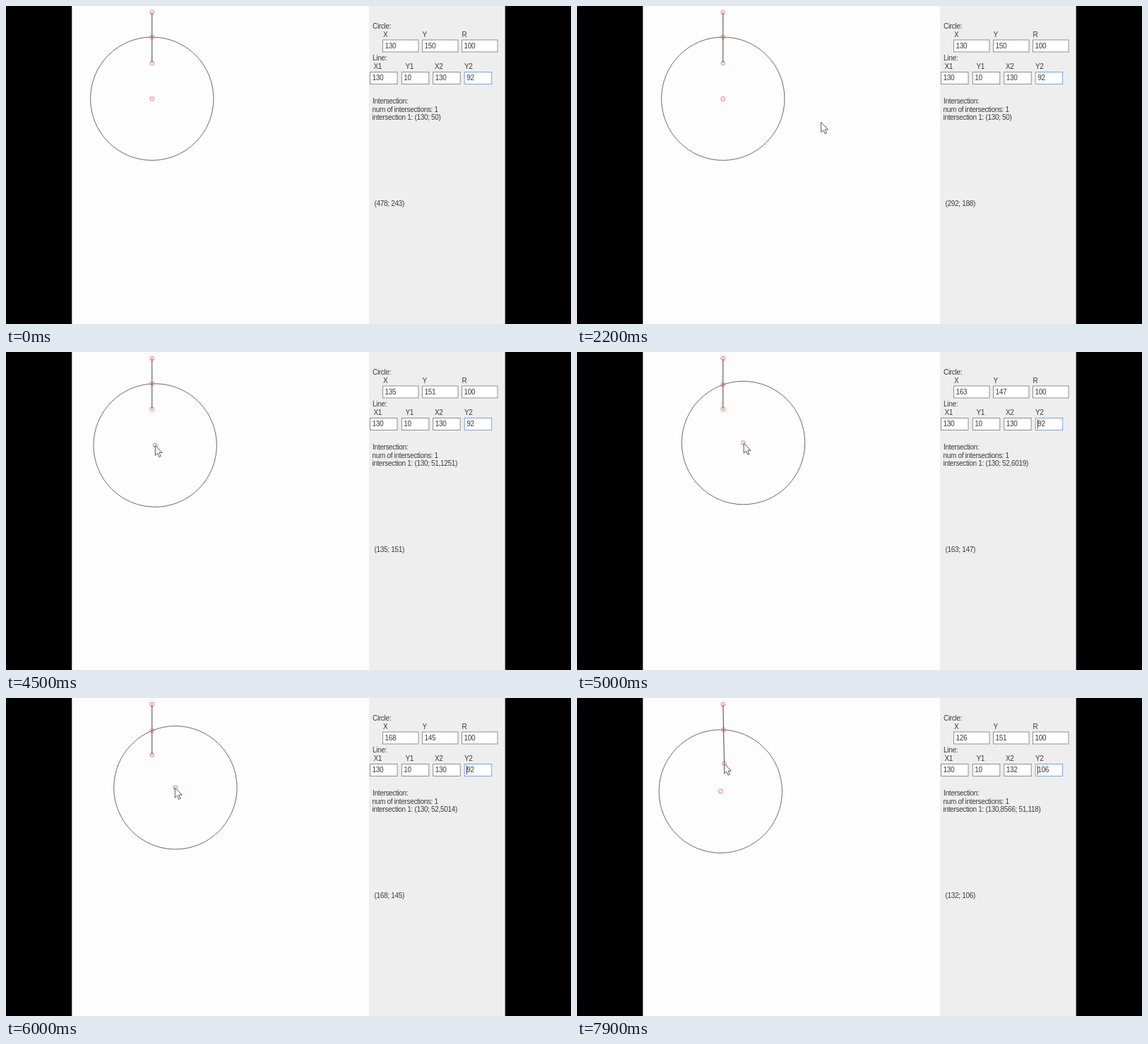
Write an HTML page that moves like this. It is 800x450 px and loops after 8 s.

```html
<!DOCTYPE html>
<html lang="en">
<head>
<meta charset="utf-8">
<title>Circle and line intersection</title>
<style>
  html, body { margin: 0; width: 100%; height: 100%; overflow: hidden; background: #000; }
  svg { display: block; width: 100%; height: 100%; }
  text { font: 10px "Liberation Sans", Arial, sans-serif; letter-spacing: -.32px; fill: #3c3c3c; white-space: pre; }
</style>
</head>
<body>
<svg id="stage" viewBox="0 0 800 450">
  <rect width="800" height="450"/>
  <rect x="93.3" width="420.7" height="450" fill="#fdfdfd"/>
  <rect x="514" width="192.7" height="450" fill="#eeeeef"/>
</svg>
<script>
const LOOP = 8000, STEP = 100, SCALE = 0.872, RADIUS = 100;
const stage = document.getElementById('stage');
const sx = x => 93.4 + x * SCALE;
const sy = y => 0.4 + y * SCALE;

function add(tag, attrs, content) {
  const el = document.createElementNS('http://www.w3.org/2000/svg', tag);
  set(el, attrs);
  if (content) el.textContent = content;
  return stage.appendChild(el);
}
function set(el, attrs) {
  for (const k in attrs) el.setAttribute(k, attrs[k]);
}
const label = (x, y, s) => add('text', { x, y }, s);
function field(x, y, w, value, stroke = '#858585') {
  add('rect', { x, y, width: w, height: 17, fill: '#fff', stroke, 'stroke-width': 0.9 });
  return label(x + 3, y + 11.8, value);
}

// Side panel
label(519, 32.3, 'Circle:');
label(534, 43.6, 'X');
label(589.5, 43.6, 'Y');
label(645.5, 43.6, 'R');
const cxField = field(533.5, 48, 50.5, '130');
const cyField = field(589.5, 48, 50.5, '150');
field(645.5, 48, 50.5, '100');
label(519, 77.4, 'Line:');
['X1', 'Y1', 'X2', 'Y2'].forEach((s, i) => label([520.5, 565.5, 607, 649][i], 88.7, s));
field(515.5, 93.5, 38.5, '130');
field(560.3, 93.5, 38.5, '10');
const x2Field = field(604.7, 93.5, 38.5, '130');
const y2Field = field(649.2, 93.5, 38.5, '92', '#6f9bdc');
const caret = add('path', { stroke: '#222', 'stroke-width': 0.9 });
label(519, 138.4, 'Intersection:');
label(518.5, 149.9, 'num of intersections: 1');
const hitText = label(518.5, 161.3, '');
const mouseText = label(521.5, 282.5, '');

// Drawing area
const circle = add('circle', { r: RADIUS * SCALE, fill: 'none', stroke: '#444', 'stroke-width': 0.8 });
const line = add('line', { x1: sx(130), y1: sy(10), stroke: '#333', 'stroke-width': 0.9 });
const dots = Array.from({ length: 4 }, () =>
  add('circle', { r: 2.8, fill: 'none', stroke: '#de4458', 'stroke-width': 0.75 }));
const beam = add('path', { d: 'M-3-8h2.5l.5.6.5-.6H3M0-7.4V7.4M-3 8h2.5l.5-.6.5.6H3', fill: 'none', stroke: '#222' });
const arrow = add('path', {
  d: 'M0 0V14.3L3.3 11.3L5.5 16.4L7.8 15.4L5.6 10.4H9.8Z',
  fill: '#fff', stroke: '#444', 'stroke-width': 0.9, 'stroke-linejoin': 'round'
});

// Mouse path: time, x, y
const keys = [
  [1100, 655, 111], [1200, 652, 112], [1600, 595, 138], [2000, 432, 180], [2200, 292, 188],
  [2500, 188, 172], [2900, 131, 154], [3400, 128, 151], [4200, 128, 151],
  [4500, 135, 151], [5100, 169, 147], [5500, 188, 147], [5700, 192, 146],
  [6000, 168, 145], [6150, 142, 143], [6350, 126, 151], [6400, 126, 151],
  [6600, 108, 134], [6900, 121, 95], [7500, 130, 92], [7600, 130, 92], [7900, 132, 106]
];

// Monotone cubic through the keys, so rests stay still
function slope(i, c) {
  const a = keys[i - 1], b = keys[i], d = keys[i + 1];
  if (!a || !d) return 0;
  const p = (b[c] - a[c]) / (b[0] - a[0]), q = (d[c] - b[c]) / (d[0] - b[0]);
  return p * q > 0 ? 2 * p * q / (p + q) : 0;
}
function mouse(t) {
  const last = keys.length - 1;
  if (t <= keys[0][0]) return keys[0].slice(1);
  if (t >= keys[last][0]) return keys[last].slice(1);
  const i = keys.findIndex(k => k[0] > t) - 1;
  const a = keys[i], b = keys[i + 1], h = b[0] - a[0], u = (t - a[0]) / h;
  return [1, 2].map(c =>
    a[c] + (b[c] - a[c]) * u * u * (3 - 2 * u) +
    h * u * (1 - u) * (slope(i, c) * (1 - u) - slope(i + 1, c) * u));
}
const point = t => mouse(t).map(Math.round);
const num = v => String(+v.toFixed(4)).replace('.', ',');

function intersect([cx, cy], [x2, y2]) {
  const dx = x2 - 130, dy = y2 - 10, fx = 130 - cx, fy = 10 - cy;
  const a = dx * dx + dy * dy, b = fx * dx + fy * dy, c = fx * fx + fy * fy - RADIUS * RADIUS;
  const u = (-b - Math.sqrt(b * b - a * c)) / a;
  return [130 + u * dx, 10 + u * dy];
}

function draw(time) {
  const t = Math.floor(time / STEP) * STEP;
  const center = t < 4300 ? [130, 150] : point(Math.min(t, 6400));
  const end = t < 7700 ? [130, 92] : point(t);
  const hit = intersect(center, end);
  const m = point(t);

  set(circle, { cx: sx(center[0]), cy: sy(center[1]) });
  set(line, { x2: sx(end[0]), y2: sy(end[1]) });
  [[130, 10], end, center, hit].forEach(([x, y], i) => set(dots[i], { cx: sx(x), cy: sy(y) }));

  cxField.textContent = center[0];
  cyField.textContent = center[1];
  x2Field.textContent = end[0];
  y2Field.textContent = end[1];
  hitText.textContent = `intersection 1: (${num(hit[0])}; ${num(hit[1])})`;
  mouseText.textContent = m[0] > 478 ? '(478; 243)' : `(${m[0]}; ${m[1]})`;

  const blink = t >= 1500 && (t < 6200 || t >= 7700) && (t + 520) % 1030 < 500;
  set(caret, { d: `M${t < 4300 ? 663 : 652}.3 95.5v13`, visibility: blink ? 'visible' : 'hidden' });

  // The pointer runs slightly ahead of the readout
  const [px, py] = mouse(t + 6), x = sx(px), y = sy(py);
  const inField = x > 649 && x < 688 && y > 93 && y < 111;
  const shown = t >= 1200;
  const transform = `translate(${x.toFixed(2)} ${y.toFixed(2)})`;
  set(beam, { transform, visibility: shown && inField ? 'visible' : 'hidden' });
  set(arrow, { transform, visibility: shown && !inField ? 'visible' : 'hidden' });
}

const start = performance.now();
function tick() {
  draw((performance.now() - start) % LOOP);
  requestAnimationFrame(tick);
}
tick();
</script>
</body>
</html>
```
